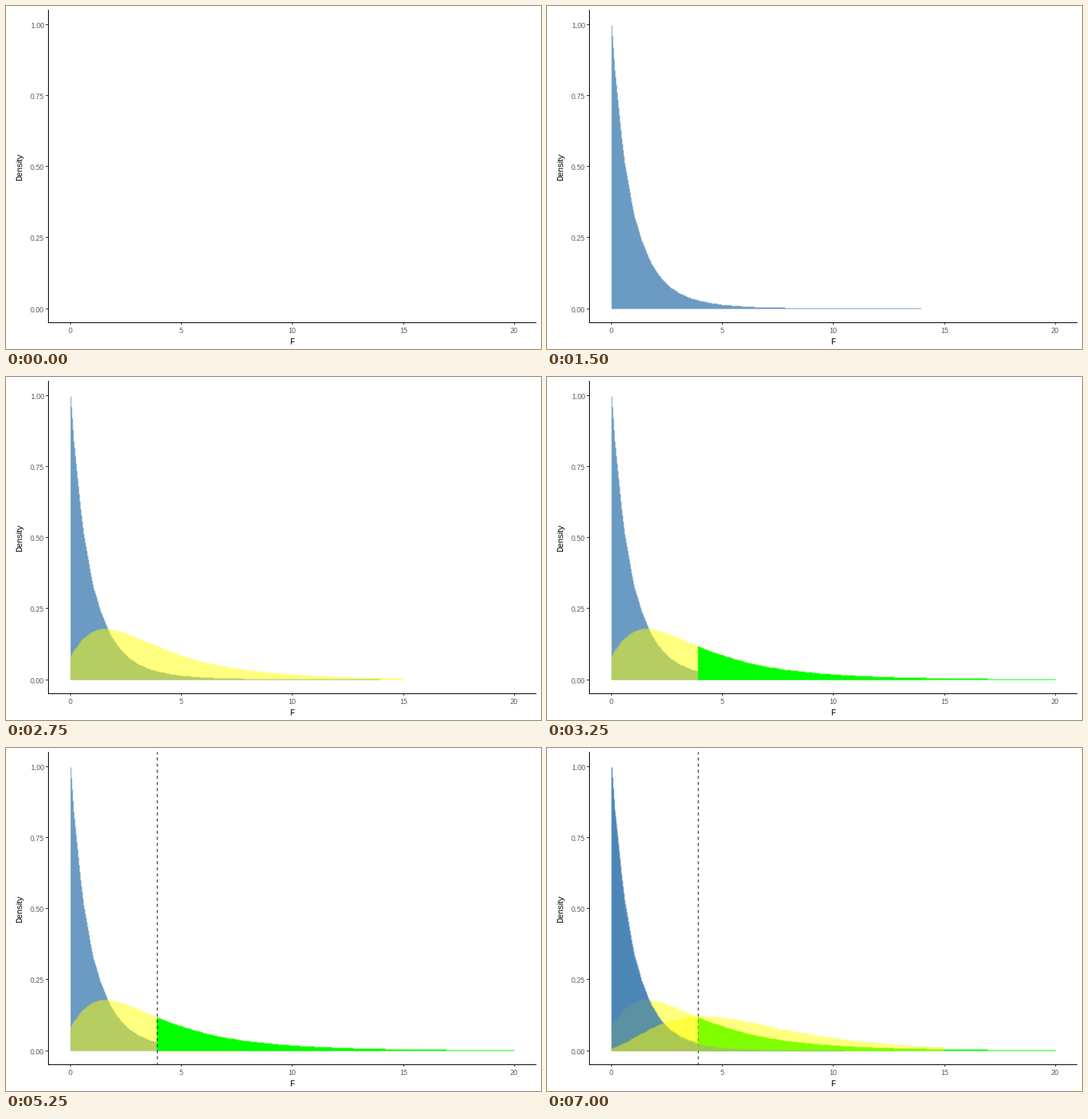
Write a matplotlib script that moves like this. It is 700 px wide and 450 px high and loops after 8 s.

```python
import math

import matplotlib.pyplot as plt
import numpy as np
from matplotlib.animation import FuncAnimation

W, H = 700, 450
STEP = 250          # ms per frame
LOOP = 8000         # ms per loop

plt.rcParams.update({
    "font.family": "Liberation Sans",
    "text.hinting": "native",
    "text.hinting_factor": 1,
    "path.simplify": False,
})

# Panel edges in pixels; the axes cover -1..21 and -0.05..1.05
LEFT, RIGHT = 55.4, 694.52
TOP, BOTTOM = 5.479, 415.73
CRIT = 3.885        # 5 % critical value of F(2, 12)


def px(x):
    return LEFT + (x + 1) * (RIGHT - LEFT) / 22


def py(y):
    return BOTTOM - (y + 0.05) * (BOTTOM - TOP) / 1.1


def f_density(x, df2, ncp=0.0):
    """Density of the noncentral F distribution with 2 and df2 degrees."""
    a = df2 / 2
    t = x / a
    total = np.zeros_like(x)
    for j in range(60):
        log_c = math.lgamma(a + 1 + j) - math.lgamma(a + 1) - math.lgamma(j + 1)
        weight = (ncp / 2) ** j * math.exp(log_c - ncp / 2 - math.lgamma(j + 1))
        total += weight * (t / (1 + t)) ** j
    return total * (1 + t) ** -(a + 1)


fig = plt.figure(figsize=(W / 100, H / 100), dpi=100, facecolor="white")
ax = fig.add_axes([0, 0, 1, 1])
ax.set(xlim=(0, W), ylim=(H, 0))
ax.axis("off")


def area(color, alpha, df2, ncp=0.0, lo=0.0, hi=15.0):
    """Area under a density, with its outline on whole pixels."""
    x = np.linspace(lo, hi, 101)
    vx = np.floor(px(x))
    vy = np.floor(py(f_density(x, df2, ncp)))
    cols = np.arange(vx[0], vx[-1] + 1)
    tops = np.ceil(np.interp(cols + 1e-6, vx, vy))
    return ax.fill_between(cols, tops, math.floor(py(0)), step="post",
                           color=color, alpha=alpha, lw=0, antialiased=False)


def dashed_line(x):
    end = int(BOTTOM)
    rows = np.arange(int(TOP), end + 1)
    on = (end - rows) % 8 < 4
    left = int(px(x))
    return ax.fill_betweenx(rows, left, left + on, step="post",
                            color="black", lw=0, antialiased=False)


def box(x, y, w, h, color):
    ax.add_patch(plt.Rectangle((x, y), w, h, color=color, lw=0,
                               antialiased=False))


def label(x, y, text, size, color, ha="center", rotation=0):
    ax.text(x, y, text, fontsize=size * 0.72, color=color, ha=ha,
            va="baseline", rotation=rotation, rotation_mode="anchor")


def draw_axes():
    x0, y0 = int(LEFT), int(BOTTOM)
    for v in (0, 0.25, 0.5, 0.75, 1):
        row = int(py(v))
        box(x0 - 3, row, 3, 1, "#333333")
        label(50, row + 5, f"{v:.2f}", 9, "#4d4d4d", ha="right")
    for v in (0, 5, 10, 15, 20):
        col = int(px(v))
        box(col, y0, 1, 3, "#333333")
        label(col, 429, str(v), 9, "#4d4d4d")
    box(x0, int(TOP), 1, y0 - int(TOP) + 1, "black")
    box(x0, y0, int(RIGHT) - x0, 1, "black")
    label(374, 444, "F", 11, "black")
    label(21, 211, "Density", 11, "black", rotation=90)


draw_axes()

# Layers from back to front with the time each one appears
layers = [
    (750, area("steelblue", 0.8, 12)),
    (2000, area("yellow", 0.5, 12, ncp=5)),
    (3250, area("lime", 1, 12, ncp=5, lo=CRIT, hi=20)),
    (4500, dashed_line(CRIT)),
    (5750, area("steelblue", 0.8, 27)),
    (7000, area("yellow", 0.5, 27, ncp=10)),
]


def update(frame):
    now = frame * STEP
    for start, artist in layers:
        artist.set_visible(now >= start)
    return [artist for _, artist in layers]


anim = FuncAnimation(fig, update, frames=LOOP // STEP, interval=STEP,
                     init_func=lambda: update(0), repeat=True,
                     repeat_delay=0, blit=False)
plt.show()
```
